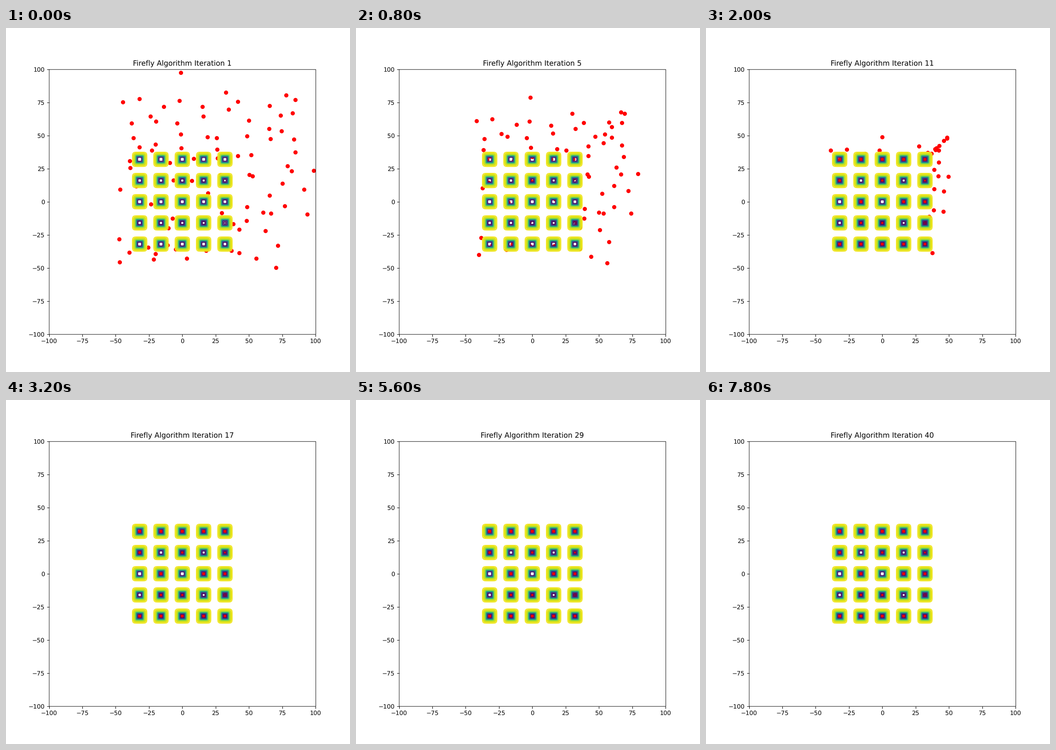
A matplotlib script for the animation above (8000 ms loop, 748x748 px).

```python
import matplotlib.pyplot as plt
import numpy as np
from matplotlib.animation import FuncAnimation

STEPS = 40
INTERVAL = 200

# Foxhole centres, row by row from the lower left; a few attract no firefly
ticks = np.arange(-32, 33, 16)
wells = np.array([(x, y) for y in ticks for x in ticks], float)
depth = np.arange(1, 26)
EMPTY = {(-16, 16), (-16, 0), (0, 0), (-32, -16), (16, -16)}
OUTLIERS = [(-1.3, 97.5), (98.6, 23.4), (70.3, -49.7), (-47, -45.6)]


def foxholes(x, y):
    total = 0.002
    for (a, b), j in zip(wells, depth):
        total = total + 1 / (j + (x - a) ** 6 + (y - b) ** 6)
    return 1 / total


def nearest(pos):
    """Offset to, and distance from, the closest well of each point."""
    diff = wells - pos[:, None]
    dist = (diff ** 4).sum(2) ** 0.25
    k = dist.argmin(1)
    rows = np.arange(len(pos))
    return diff[rows, k], dist[rows, k]


def downhill(pos):
    diff = pos[:, None] - wells
    bowl = depth + (diff ** 6).sum(2)
    grad = -(diff ** 5 / bowl[..., None] ** 2).sum(1)
    return grad / (np.linalg.norm(grad, axis=1, keepdims=True) + 1e-30)


def start_swarm(rng):
    """One firefly by each busy well, and one per cell of the land around."""
    swarm = list(OUTLIERS)
    for x, y in wells:
        if (x, y) not in EMPTY:
            angle, r = rng.uniform(0, 2 * np.pi), rng.uniform(4.5, 9)
            swarm.append((x + r * np.cos(angle), y + r * np.sin(angle)))
    for x in np.linspace(-50, 95, 11)[:-1]:
        for y in np.linspace(-50, 85, 10)[:-1]:
            p = rng.uniform((x, y), (x + 14.5, y + 15))
            home = tuple(p + nearest(p[None])[0][0].round(9))
            home = tuple(np.round(home).astype(int))
            outside = np.abs(p).max() > 38
            if outside and p[0] - p[1] < 120 and home not in EMPTY:
                swarm.append(tuple(p))
    return np.array(swarm)


def swarm_path():
    rng = np.random.default_rng(4)
    pos = start_swarm(rng)
    start = nearest(pos)[1]
    speed = np.minimum(1.5 + 0.052 * start, 0.19 * start)
    path = [pos]
    for _ in range(STEPS - 1):
        offset, dist = nearest(pos)
        length = np.linalg.norm(offset, axis=1)
        straight = offset / (length[:, None] + 1e-9)
        far = (dist > 9)[:, None]
        heading = np.where(far, downhill(pos), straight)
        step = np.minimum(speed, length)[:, None]
        jitter = rng.normal(0, 0.3, pos.shape) * far
        pos = pos + heading * step + jitter
        path.append(pos)
    return path


path = swarm_path()

plt.rcParams["text.hinting"] = "none"
fig, ax = plt.subplots(figsize=(8, 8), dpi=93.5)
grid = np.linspace(-100, 100, 500)
X, Y = np.meshgrid(grid, grid)
ax.contour(X, Y, foxholes(X, Y), levels=np.arange(0, 501, 10), cmap="viridis")
dots = ax.scatter(path[0][:, 0], path[0][:, 1], c="red")
ax.set_xlim(-100, 100)
ax.set_ylim(-100, 100)
title = ax.set_title("")

# Soft, unsnapped frame line in place of the spines
ax.spines[:].set_visible(False)
fig.add_artist(plt.Rectangle((100.5 / 800, 87.5 / 800), 620 / 800, 616 / 800,
                             fill=False, lw=0.72, snap=False))


def update(i):
    dots.set_offsets(path[i])
    title.set_text(f"Firefly Algorithm Iteration {i + 1}")
    return dots, title


anim = FuncAnimation(fig, update, frames=STEPS, interval=INTERVAL,
                     repeat=True, repeat_delay=0)
plt.show()
```
